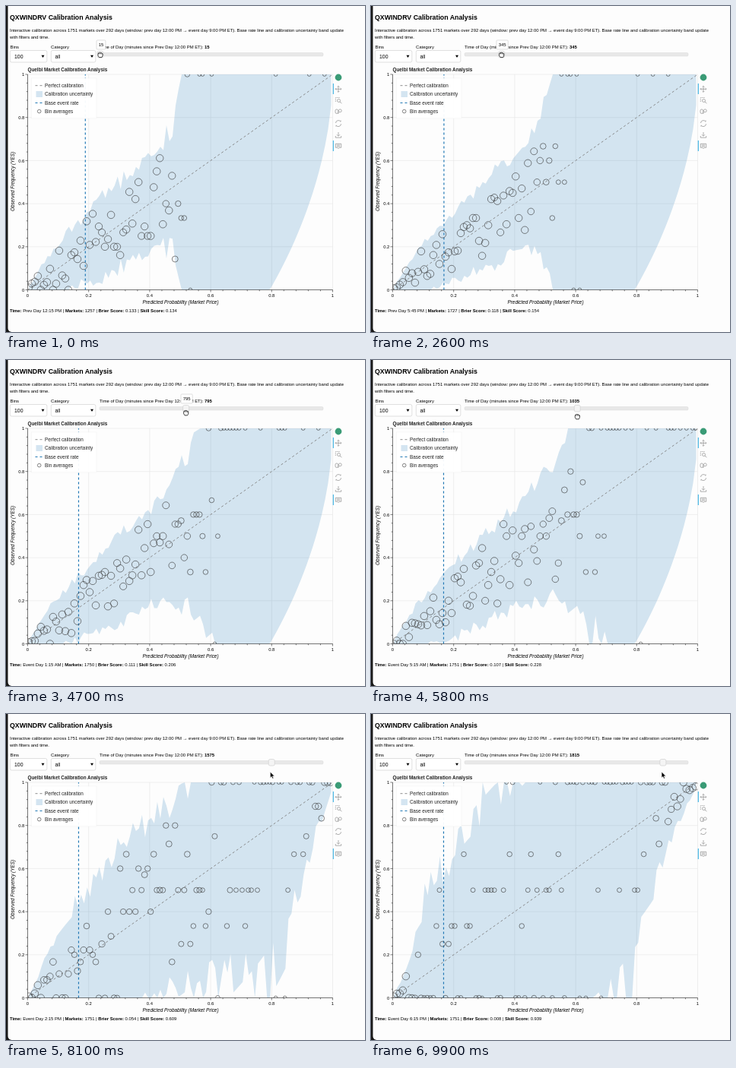
An HTML page for the animation above (10000 ms loop, 472 px wide and 429 px high).

```html
<!DOCTYPE html>
<html lang="en">
<head>
<meta charset="utf-8">
<title>Calibration Analysis</title>
<style>
html, body { margin: 0; width: 100%; height: 100%; overflow: hidden; background: #181818; }
svg { display: block; font: 5.89px "Liberation Sans", Arial, sans-serif; fill: #000; }
text { white-space: pre; }
.b { font-weight: bold; }
.plot { font-size: 6.37px; fill: #222; }
.ui { fill: #fff; stroke: #ccc; stroke-width: .6; }
.grey { fill: none; stroke: #9a9a9a; stroke-width: .8; }
.band { fill: #1f77b4; fill-opacity: .19; }
.diag { stroke: #808080; stroke-width: .9; stroke-dasharray: 3; }
.base { stroke: #1f77b4; stroke-width: 1.2; stroke-dasharray: 3; }
.dot { fill: none; stroke: #333; stroke-width: .6; }
</style>
</head>
<body>
<svg width="472" height="429" viewBox="0 0 472 429">
  <rect x="2.5" y="-10" width="490" height="439" rx="5" fill="#fdfdfd"/>
  <g transform="translate(0 1)">
    <text class="b" x="5" y="17" font-size="8.8">QXWINDRV Calibration Analysis</text>
    <text x="5" y="33">Interactive calibration across 1751 markets over 292 days (window: prev day 12:00 PM → event day 9:00 PM ET). Base rate line and calibration uncertainty band update</text>
    <text x="5" y="42">with filters and time.</text>
    <text x="5.5" y="55">Bins</text>
    <text x="59" y="55">Category</text>
    <rect class="ui" x="5.3" y="57.5" width="48.5" height="15.5" rx="2"/>
    <rect class="ui" x="59.3" y="57.5" width="58.5" height="15.5" rx="2"/>
    <text x="11" y="67.7" font-size="6.87">100</text>
    <text x="64.5" y="67.7" font-size="6.87">all</text>
    <path d="M46.5 63.7h4l-2 3.4zM111 63.7h4l-2 3.4z"/>
    <text x="123" y="55" id="label"></text>
    <rect x="123" y="60.5" width="294" height="4.5" rx="1.5" fill="#e8e8e8" stroke="#d8d8d8" stroke-width=".5"/>
    <text class="plot b" x="28.5" y="85">Quelbi Market Calibration Analysis</text>
    <clipPath id="clip"><rect x="28.5" y="89" width="401" height="283.5"/></clipPath>
    <g id="grid"></g>
    <g id="data" clip-path="url(#clip)"></g>
    <g class="plot">
      <rect x="33.5" y="94" width="85.5" height="53" fill="#fff" fill-opacity=".95" stroke="#e5e5e5" stroke-opacity=".5" stroke-width=".5"/>
      <path class="diag" d="M38.5 103.7h10"/>
      <rect class="band" x="39.5" y="111" width="8.5" height="8"/>
      <path class="base" d="M38.5 126.5h10"/>
      <circle class="dot" cx="43.7" cy="137.6" r="2.3"/>
      <text x="51" y="106">Perfect calibration</text>
      <text x="51" y="117.3">Calibration uncertainty</text>
      <text x="51" y="128.7">Base event rate</text>
      <text x="51" y="140">Bin averages</text>
    </g>
    <g font-size="6.37" font-style="italic" text-anchor="middle">
      <text x="229.5" y="391">Predicted Probability (Market Price)</text>
      <text transform="translate(10.7 230) rotate(-90)">Observed Frequency (YES)</text>
    </g>
    <circle cx="437" cy="93" r="4.4" fill="#3a9b76"/>
    <path d="M430.3 101v14M430.3 176v14" stroke="#26aae1" fill="none"/>
    <g class="grey">
      <path d="M433 108.3h8M437 104.3v8M434.3 107l-1.3 1.3 1.3 1.3M439.7 107l1.3 1.3-1.3 1.3M435.7 105.6l1.3-1.3 1.3 1.3M435.7 111l1.3 1.3 1.3-1.3"/>
      <path d="M433.3 125v-5.5h5.5" stroke-dasharray="1.5 .8"/>
      <circle cx="437.5" cy="123.5" r="2"/><path d="M439 125l2.3 2.3"/>
      <rect x="433" y="135" width="3.5" height="5.5" rx="1.7"/>
      <circle cx="439.3" cy="136.8" r="1.9"/><path d="M438 138.5l-1.5 2.5"/>
      <path d="M433.5 153a3.5 3.5 0 0 1 6.5-1.7v-1.8M440.5 154.2a3.5 3.5 0 0 1-6.5 1.7v1.8"/>
      <path d="M437 165v5M435 168.3l2 2 2-2M433.3 170v2.2h7.4V170"/>
      <path d="M433.3 180.3h7.4v5h-2.7l-1 1.3-1-1.3h-2.7zM434.8 182h4.4M434.8 183.7h4.4"/>
    </g>
    <text x="5" y="402" id="stats"></text>
    <g id="pointer"></g>
  </g>
</svg>
<script>
const $ = id => document.getElementById(id);
const X = v => 28.5 + 401 * v, Y = v => 372.5 - 283.5 * v;
const lerp = (a, b, f) => a + (b - a) * f;
const clamp = v => Math.max(0, Math.min(1, v));
const smooth = v => (v = clamp(v), v * v * (3 - 2 * v));

// time in ms, slider minutes, skill score
const keys = [
  [0, 15, .134], [1600, 150, .123], [3500, 525, .181], [5800, 1035, .228],
  [7300, 1440, .356], [8700, 1680, .799], [9900, 1815, .939]
];

function stateAt(t) {
  const k = Math.max(1, keys.findIndex(key => key[0] >= t));
  const [a, b] = [keys[k - 1], keys[k]], f = (t - a[0]) / (b[0] - a[0]);
  return { minutes: Math.round(lerp(a[1], b[1], f) / 15) * 15, skill: lerp(a[2], b[2], f) };
}

function random(i, seed) {
  const v = Math.sin(i * 12.99 + seed * 78.23) * 43758.55;
  return v - Math.floor(v);
}

// Random value per bin and channel that drifts to a new one every second
function drift(i, channel, t) {
  const s = Math.floor(t / 1000);
  return lerp(random(i, s * 3 + channel), random(i, s * 3 + 3 + channel), t / 1000 - s);
}

// Expected samples at price p: a broad mass of prices that thins out
// through the day while they gather at 0 and 1
function density(p, minutes) {
  const late = minutes / 1815;
  const mass = 18 * (1.6 - 1.5 * p) / (1 + (minutes / 1400) ** 9);
  const edge = .49 + .4 * late ** 3, soft = .015 + .08 * late;
  return 150 * Math.exp(-p / .02)
    + mass / (1 + Math.exp((p - edge) / soft))
    + 50 * late ** 8 * Math.exp((p - 1) / .05)
    + .12 + .4 * late;
}

function drawData(t, minutes, base) {
  const upper = [], lower = [];
  let dots = "";
  for (let i = 0; i < 100; i++) {
    const p = (i + .5) / 100;
    const spread = Math.exp(.8 * (drift(i, 0, t) - .5));
    const count = Math.floor(density(p, minutes) * spread + drift(i, 1, t));
    const n = Math.max(1, count), error = Math.sqrt(p * (1 - p) / n);
    upper.push([X(p), Y(clamp(p + 1.96 * error))]);
    lower.unshift([X(p), Y(clamp(p - 1.96 * error))]);
    if (!count) continue;
    const mean = clamp(Math.round(n * (p + 3.4 * (drift(i, 2, t) - .5) * error)) / n);
    const r = Math.min(4.8, 2.4 + .8 * Math.log(n));
    dots += `<circle cx="${X(i / 100) + 1.3}" cy="${Y(mean)}" r="${r}"/>`;
  }
  $("data").innerHTML = `<polygon class="band" points="${upper.concat(lower).join(" ")}"/>
    <path class="diag" d="M28.5 372.5L429.5 89"/>
    <path class="base" d="M${X(base)} 372.5V89"/>
    <g class="dot">${dots}</g>`;
}

function drawGrid() {
  let lines = "", ticks = "M28.5 89V372.5H429.5", text = "";
  for (let i = 0; i <= 25; i++) {
    const v = i / 25, major = i % 5 == 0, len = major ? 3 : 1.8;
    ticks += `M${X(v)} 372.5v${len}M28.5 ${Y(v)}h${-len}`;
    if (!major) continue;
    const label = +v.toFixed(1);
    lines += `M${X(v)} 89V372.5M28.5 ${Y(v)}H429.5`;
    text += `<text x="${X(v)}" y="382" text-anchor="middle">${label}</text>
      <text x="24.3" y="${Y(v) + 2.1}" text-anchor="end">${label}</text>`;
  }
  $("grid").innerHTML = `<path d="${lines}" stroke="#e5e5e5" stroke-width=".6"/>
    <path d="${ticks}" fill="none" stroke="#222" stroke-width=".6"/>${text}`;
}

function drawPointer(t, minutes) {
  const knob = 121.8 + .1444 * minutes, w = 5 + 3.4 * String(minutes).length;
  const y = 63.3 + 12 * smooth((t - 3000) / 3700);
  const tip = `<rect class="ui" x="${knob + 1 - w / 2}" y="44" width="${w}" height="12" rx="1"/>
    <text x="${knob + 1}" y="51.5" text-anchor="middle">${minutes}</text>`;
  const hand = `<path d="M-3-.8Q-3-3-1.5-2.6Q-.5-3.6.5-2.7Q1.8-3.2 2.2-2.1Q3.4-2 3.2-.4Q3.2 2 2 3.3H-1.6Q-3.5 1.2-3-.8ZM-1.4-2.4v1.4M.5-2.5v1.5M2.1-2v1.2" fill="#fff" stroke="#111" stroke-width=".8"/>`;
  const arrow = `<path d="M-1.8 0v7.6l1.8-1.6 1.2 2.8 1.3-.5-1.2-2.8h2.5z" stroke="#fff" stroke-width=".5"/>`;
  $("pointer").innerHTML = `<rect class="ui" x="${knob - 4}" y="58.5" width="8" height="8.5" rx="2" style="fill:#f4f4f4"/>
    ${t <= 5500 ? tip : ""}<g transform="translate(${knob} ${y})">${t < 6700 ? hand : arrow}</g>`;
}

function clock(minutes) {
  const h = 12 + Math.floor(minutes / 60), mm = String(minutes % 60).padStart(2, "0");
  return `${h < 24 ? "Prev" : "Event"} Day ${h % 12 || 12}:${mm} ${h % 24 < 12 ? "AM" : "PM"}`;
}

function draw(t) {
  const { minutes, skill } = stateAt(t), since = minutes - 15;
  const base = .167 + .022 * Math.exp(-since / 110);
  const markets = 1751 - 494 * Math.exp(-((since / 80.5) ** .785));
  const brier = (1 - skill) * base * (1 - base);
  const bold = s => `<tspan class="b">${s}</tspan>`;
  $("label").innerHTML = "Time of Day (minutes since Prev Day 12:00 PM ET): " + bold(minutes);
  $("stats").innerHTML = [["Time", clock(minutes)], ["Markets", Math.round(markets)],
    ["Brier Score", brier.toFixed(3)], ["Skill Score", skill.toFixed(3)]]
    .map(([name, v]) => `${bold(name + ":")} ${v}`).join(" | ");
  drawData(t, minutes, base);
  drawPointer(t, minutes);
}

let shown = -1;
const start = performance.now();
function tick() {
  const t = Math.floor((performance.now() - start) % 10000 / 100) * 100;
  if (t != shown) draw(shown = t);
  requestAnimationFrame(tick);
}
drawGrid();
tick();
</script>
</body>
</html>
```
